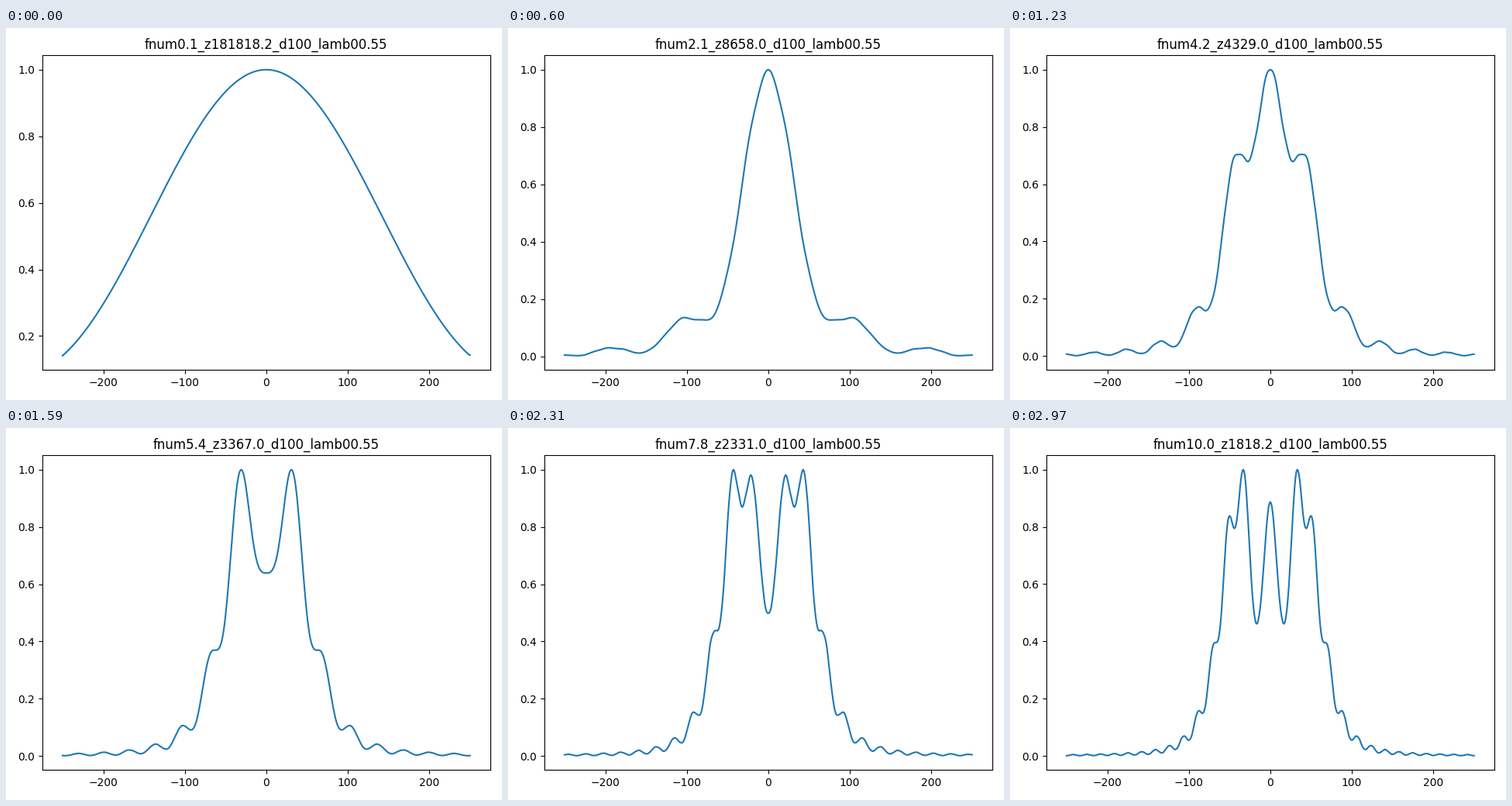
These frames come from a looping animation (640x480 px, 3000 ms). A matplotlib script:

```python
import numpy as np
import matplotlib.pyplot as plt
from matplotlib.animation import FuncAnimation

WAVE = 0.55       # wavelength, um
SLIT = 100        # slit width, um
SPAN = 300        # width of the sampled plane, um
N = 500
FRAMES = 100

STEP = SPAN / N
index = np.arange(-N // 2, N // 2)
aperture = (np.abs(index * STEP) <= SLIT / 2).astype(float)

# Zero-padded spectrum of the slit
padded = np.pad(aperture, N // 2)
spectrum = np.fft.fft(np.fft.ifftshift(padded))
freq = np.fft.fftfreq(2 * N, STEP)
kz = 2 * np.pi * np.sqrt(np.maximum(1 / WAVE**2 - freq**2, 0))

xs = np.arange(-N // 2, N // 2 + 1)


def diffract(z):
    """Band-limited angular spectrum propagation over distance z."""
    limit = 1 / (WAVE * np.hypot(z / SPAN, 1))
    transfer = np.exp(1j * kz * z) * (np.abs(freq) <= limit)
    field = np.fft.fftshift(np.fft.ifft(spectrum * transfer))
    intensity = np.abs(field[N // 2:N // 2 + N]) ** 2
    return np.interp(xs, index, intensity / intensity.max())


fig, ax = plt.subplots(figsize=(6.4, 4.8), dpi=100)
line, = ax.plot(xs, np.zeros(xs.size))


def draw(i):
    fnum = (i + 1) / 10
    z = SLIT**2 / (WAVE * fnum)
    line.set_data(xs, diffract(z))
    ax.relim()
    ax.autoscale_view()
    ax.set_title(f"fnum{fnum:.1f}_z{z:.1f}_d{SLIT}_lamb0{WAVE}")
    return line,


draw(0)
fig.tight_layout()
fig.subplots_adjust(top=1 - 35.33 / 480)
anim = FuncAnimation(fig, draw, frames=FRAMES, interval=30, repeat=True)
plt.show()
```
